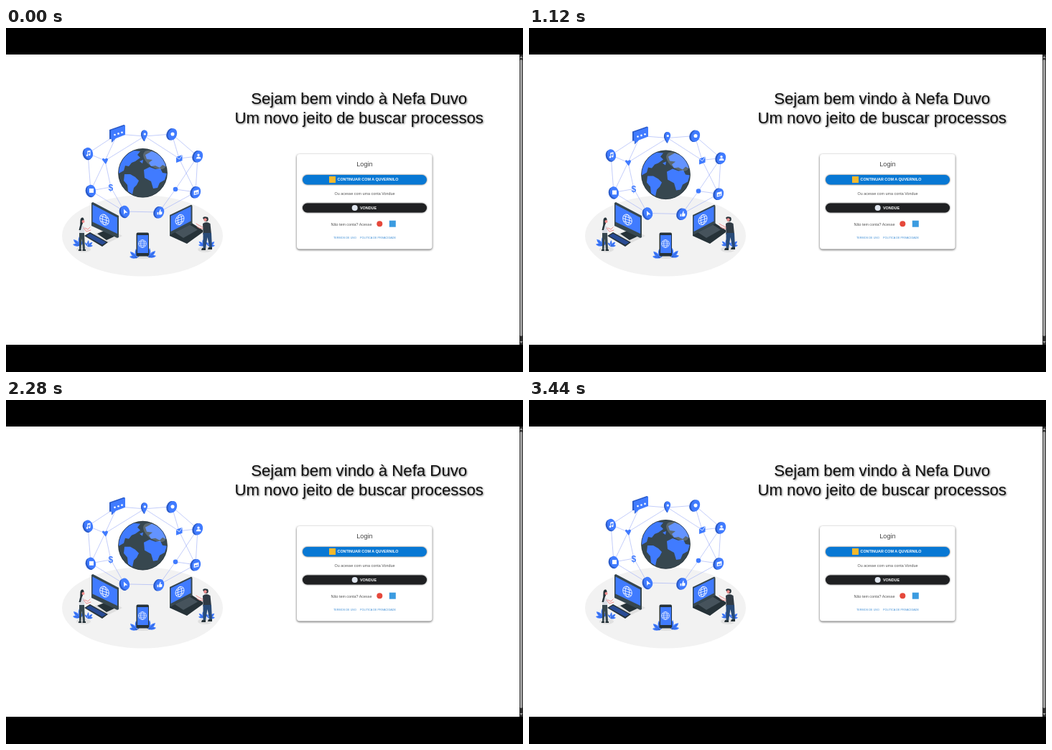
Recreate the animation shown at these times as an HTML page. Size 720 by 480 pixels, loop 3.48 s.

```html
<!DOCTYPE html>
<html lang="pt">
<head>
<meta charset="utf-8">
<style>
  html, body { margin: 0; width: 100%; height: 100%; overflow: hidden; background: #000; }
  svg { display: block; width: 720px; height: 480px; font-family: "Liberation Sans", Arial, sans-serif; }
  .title { font-size: 22.2px; text-anchor: middle; fill: #111; filter: drop-shadow(1.5px 1.5px 1.2px #777); }
  .card { filter: drop-shadow(0 1px 1.6px #000a); }
  .button { filter: drop-shadow(0 .5px .8px #000a); }
  .label { font-size: 5.4px; fill: #555; }
  .caps { font-size: 5.4px; font-weight: bold; fill: #fff; }
  .link { font-size: 3.8px; fill: #4390d6; }
  .dark { fill: #263238; }
  .slate { fill: #37474f; }
  .blue { fill: #407bff; }
  .line { fill: none; stroke: #fff; stroke-width: .7; }
  .skin { fill: none; stroke: #f28f8f; stroke-width: 1; stroke-linecap: round; }
</style>
</head>
<body>
<svg viewBox="0 0 720 480">
  <defs>
    <g id="wire" class="line">
      <circle r="6"/><ellipse rx="2.7" ry="6"/>
      <path d="M-6 0H6M-5 -3H5M-5 3H5"/>
    </g>
    <g id="plant" class="blue">
      <path d="M0 0Q-4 -7 -1 -13Q4 -7 0 0M0 0Q-8 -2 -9 -9Q-1 -8 0 0M0 0Q-7 2 -10 -2Q-5 -5 0 0M0 0Q5 -2 6 -8Q0 -7 0 0"/>
      <path d="M0 0L-1 -10M0 0L-7 -7M0 0L-7 -2M0 0L5 -6" fill="none" stroke="#2454b8" stroke-width=".6"/>
    </g>
    <clipPath id="disc"><circle cx="190.5" cy="202.3" r="34.3"/></clipPath>
  </defs>

  <path d="M0 37H715V442H0Z" fill="#fff"/>
  <path d="M715 37H720V442H715Z" fill="#2c2c2c"/>
  <rect x="715.7" y="44" width="3.4" height="386" rx="1.7" fill="#9f9f9f"/>
  <path d="M715.500 42L717.500 39L719.500 42ZM715.500 437L717.500 440L719.500 437Z" fill="#9f9f9f"/>

  <g class="title">
    <text x="491.7" y="106">Sejam bem vindo à Nefa Duvo</text>
    <text x="491.7" y="133">Um novo jeito de buscar processos</text>
  </g>

  <rect class="card" x="405" y="176" width="188.5" height="132.5" rx="4" fill="#fff"/>
  <text x="499.5" y="192.7" font-size="9.2" text-anchor="middle" fill="#444">Login</text>
  <rect class="button" x="413" y="205" width="173" height="13.5" rx="6.7" fill="#0878d4"/>
  <rect x="450" y="207" width="9" height="9" fill="#f5b92c"/>
  <text class="caps" x="461.5" y="213.4">CONTINUAR COM A QUVERNILO</text>
  <text class="label" x="499.5" y="233" text-anchor="middle">Ou acesse com uma conta Vondue</text>
  <rect class="button" x="413" y="244.5" width="173" height="13" rx="6.5" fill="#1f2022"/>
  <circle cx="485.7" cy="251" r="4" fill="#dfe5ee"/>
  <text class="caps" x="493" y="252.9">VONDUE</text>
  <text class="label" x="452.5" y="275.7">Não tem conta? Acesse</text>
  <circle cx="520.3" cy="273.2" r="4" fill="#e5483b"/>
  <rect x="533.8" y="268.7" width="9" height="9" fill="#3b9be0"/>
  <text class="link" x="456" y="293.8">TERMOS DE USO</text>
  <text class="link" x="493" y="293.8">POLÍTICA DE PRIVACIDADE</text>

  <ellipse cx="190" cy="290" rx="112" ry="56.5" fill="#f2f2f2"/>
  <g fill="#e0e0e0">
    <ellipse cx="108" cy="309" rx="10" ry="4"/><ellipse cx="277" cy="309" rx="10" ry="4"/>
    <ellipse cx="190" cy="318" rx="17" ry="4"/><path d="M122 288L142 279L162 290L142 300Z"/>
  </g>
  <g id="plants"></g>

  <!-- desktop -->
  <path class="dark" d="M127 287L144 280L157 288L140 296ZM136 274H146V290H136Z"/>
  <path class="slate" d="M119 244L121 243L157 262V292L155 293L119 276Z"/>
  <path class="blue" d="M120.5 246.500L155 264.500V287L120.500 270.500Z"/>
  <use href="#wire" transform="matrix(1.05 .35 0 1.2 137 267.5)"/>
  <path class="dark" d="M109 290L117 285L142 299L134 305Z"/>
  <path d="M111.5 290L117 286.7L139.5 299L134 302.5Z" fill="#294b94"/>

  <!-- laptop -->
  <path class="dark" d="M228 286L257 271L274 282V285L252 301L228 290Z"/>
  <path d="M235 285L256 274.500L267 281.500L247 293Z" fill="#46535c"/>
  <path class="slate" d="M228 261L257 247Q259.500 246 259.500 249V273L228 289Z"/>
  <path class="blue" d="M229.500 262.500L257.500 249V269.500L229.500 284Z"/>
  <use href="#wire" transform="matrix(1 -.35 0 1.15 242 267.5)"/>

  <!-- phone -->
  <rect class="dark" x="181.5" y="285.5" width="17.5" height="33" rx="2"/>
  <path class="blue" d="M183 289H198V314H183Z"/>
  <use href="#wire" transform="translate(190 301) scale(.9)"/>

  <!-- woman -->
  <path d="M102 277Q106 274 109.500 278L109 289H102Z" fill="#d9dde4"/>
  <path class="slate" d="M102 286H109L110 309H107L105.500 294L104.500 309H102Z"/>
  <path class="dark" d="M103.500 268Q104 264 107 264.500Q109.500 266 108 270L105.500 276L104 282L101.500 282Q104 275 103.500 268ZM101 309H105V311H101ZM106.500 309H111V311H106.500Z"/>
  <circle cx="107.5" cy="270" r="2" fill="#f28f8f"/>
  <path class="skin" d="M108 279L112 284L118 282M110 279L114 281L117 278"/>

  <!-- man -->
  <path d="M274 273Q279 269 284.500 273L286 288H274.500Z" fill="#303b45"/>
  <path d="M274.500 286H286L287 307H283.500L280.500 292L278 308H274.500Z" fill="#294b78"/>
  <path class="dark" d="M274 265Q275 262 281 264Q283 268 280 270H277ZM273 307H278V310H272ZM282 306H287V309H281Z"/>
  <circle cx="277.5" cy="267.5" r="2.2" fill="#f28f8f"/>
  <path class="skin" d="M274 278L268 275L265 273M274 280L269 279L266 277"/>

  <g id="network">
    <path id="links" fill="none" stroke="#9aabf7" stroke-width=".6"/>
    <g clip-path="url(#disc)">
      <circle class="slate" cx="190.5" cy="202.3" r="34.3"/>
      <path class="blue" d="M157 196Q162 178 177 171L187 172L183 177L187 181L180 186L175 188L171 193L166 192L164 199L157 203Z
        M165 204L173 204L180 208L185 213L182 219L178 223L176 232L170 228L169 219L164 213Z
        M194 177L203 172L213 176L222 184L224 194L218 191L214 195L208 192L202 193L199 188L204 184L196 183Z
        M192 198L200 194L208 197L215 196L218 202L224 203L221 212L214 216L211 223L205 224L202 214L193 209Z
        M186 186L191 184L190 189Z"/>
      <ellipse cx="207" cy="184" rx="18" ry="10" transform="rotate(35 207 184)" fill="#fff" opacity=".18"/>
    </g>
    <circle cx="190.5" cy="202.3" r="33.9" fill="none" stroke="#2c3940" stroke-width=".8"/>
    <path d="M144 142L164 135Q166 135 166 137V148L152 154L147 160V155L144 155Z" fill="#2b5bc9"/>
    <path class="blue" d="M146 143L166 136V149L153 154L148 159V155H146Z"/>
    <g fill="#fff"><circle cx="151.5" cy="149" r="1.3"/><circle cx="156.5" cy="147.4" r="1.3"/><circle cx="161.5" cy="145.8" r="1.3"/></g>
    <path d="M192 158Q187 151 188 147Q189 142 193 142.500V158Z" fill="#2b5bc9"/>
    <path class="blue" d="M193 158Q189 151 189.500 147Q190 142 194 142.500Q198 144 197 149Z"/>
    <circle cx="193.3" cy="148" r="1.6" fill="#fff"/>
    <path class="blue" d="M139 190L134 184Q134 180 137.500 183Q142 180 142 184ZM237 180L245.500 177V185L237 188Z"/>
    <path d="M237 180L241.500 183L245.500 177" fill="none" stroke="#fff" stroke-width=".8"/>
    <circle class="blue" cx="236" cy="225" r="3.3"/>
    <text class="blue" x="142.500" y="226.500" font-size="12" font-weight="bold">$</text>
  </g>
</svg>
<script>
const $ = id => document.getElementById(id);

const nodes = {
  note: [114, 175], bubble: [155, 148], pin: [193, 151], dot: [231, 148], user: [267, 179],
  photo: [264, 229], thumb: [213, 257], cursor: [165, 256], square: [118, 227],
  heart: [138, 185], mail: [241, 182], bird: [236, 225], dollar: [146, 222]
};
const routes = [
  "note bubble pin dot user photo thumb cursor square note",
  "note heart bubble", "pin heart square dollar cursor", "heart dollar",
  "pin mail dot", "user mail photo bird thumb", "user bird"
];
$("links").setAttribute("d", routes.map(r => "M" + r.split(" ").map(n => nodes[n]).join("L")).join(""));

// White glyphs, centred on their badge
const glyphs = {
  note: "M-2 -4L3 -5V2A1.5 1.5 0 1 1 1.8 .7V-2.7L-.8 -2V3A1.5 1.5 0 1 1 -2 1.8Z",
  dot: "M-3 0A3 3 0 1 1 3 0A3 3 0 1 1 -3 0Z",
  user: "M-2 -2A2 2 0 1 1 2 -2A2 2 0 1 1 -2 -2ZM-4 4Q-3 0 0 .5Q4 0 4 4Z",
  photo: "M-4 -2L4 -4V3L-4 5ZM-3 3L-1 0L1 2L2 -1L3 2Z",
  thumb: "M-4 0H-2V4H-4ZM-1 0L1 -5L2 -4L1.5 -1H4V3L2 4H-1Z",
  cursor: "M-2.5 -4L4 2L0 2L-2 5Z",
  square: "M-3.5 -3.5H3.5V3.5H-3.5Z"
};
// Badges right of the globe lean the other way
const badge = ([name, d]) => {
  const [x, y] = nodes[name], side = x < 190 ? -1 : 1;
  return `<g transform="translate(${x} ${y})">
  <ellipse cx="-1" cy=".7" rx="6.4" ry="8.4" transform="rotate(${18 * side})" fill="#2b5bc9"/>
  <ellipse cx="1" rx="6" ry="8.2" transform="rotate(${18 * side})" class="blue"/>
  <path d="${d}" transform="translate(1 0) scale(.85)" fill="#fff" fill-rule="evenodd"/></g>`;
};
$("network").insertAdjacentHTML("beforeend", Object.entries(glyphs).map(badge).join(""));

const plants = [[103, 304, 1], [114, 305, -.7], [182, 321, 1], [199, 320, -1], [283, 305, -.8], [275, 304, .7]];
$("plants").innerHTML = plants.map(() => '<use href="#plant"/>').join("");

const LOOP = 3480, FLOAT = 4000, LOWEST = 1300;

function draw(now) {
  const wave = Math.cos(2 * Math.PI * (now % LOOP - LOWEST) / FLOAT);
  $("network").setAttribute("transform", `translate(0 ${1.75 * (wave + .454)})`);
  plants.forEach(([x, y, s], i) =>
    $("plants").children[i].setAttribute("transform",
      `translate(${x} ${y}) scale(${s} ${Math.abs(s)}) rotate(${1.5 * wave})`));
  requestAnimationFrame(draw);
}
requestAnimationFrame(draw);
</script>
</body>
</html>
```
